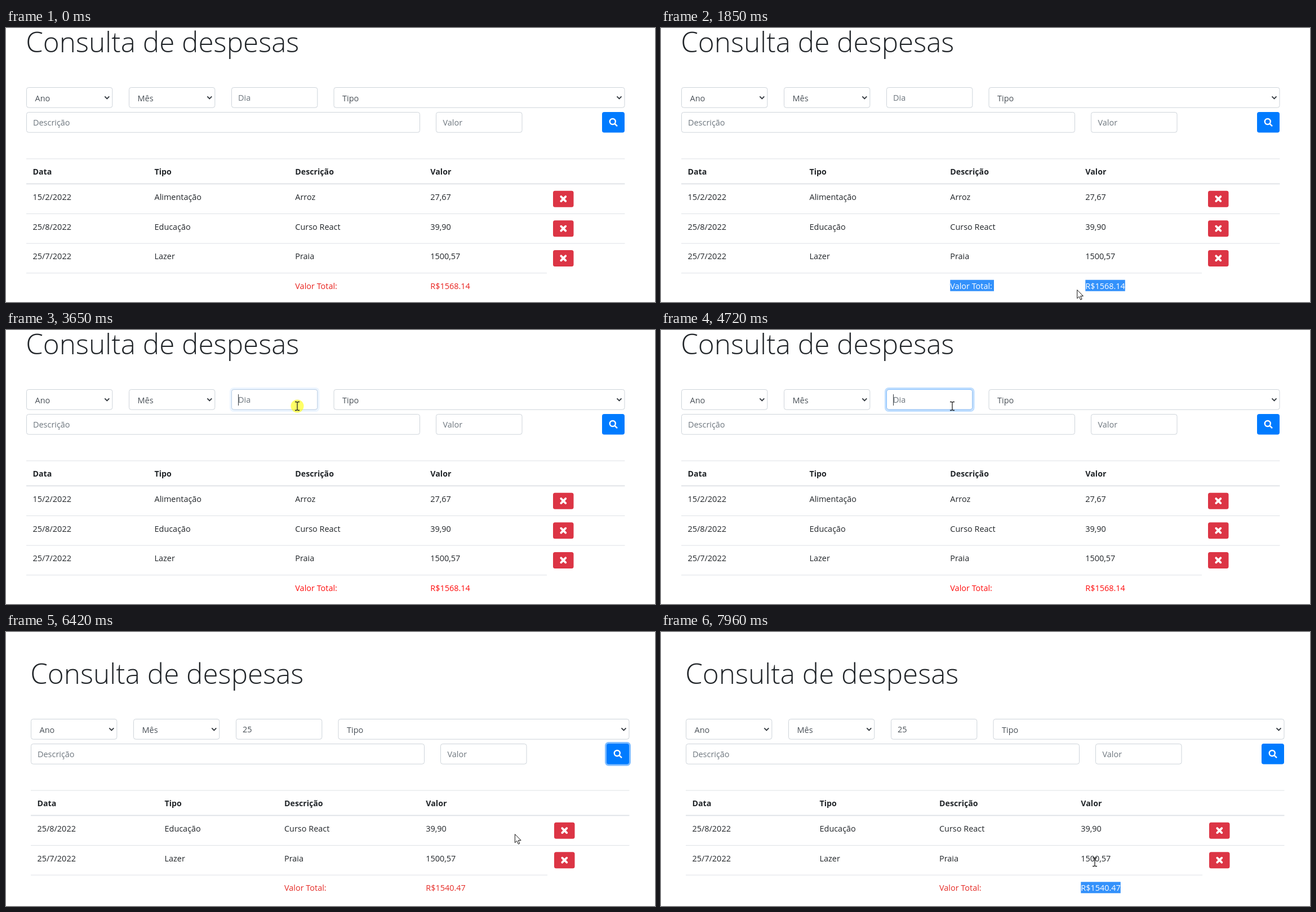
An HTML page that plays this animation: 1152 px wide and 486 px high, repeating every 8 s.

```html
<!DOCTYPE html>
<html lang="pt">
<head>
<meta charset="utf-8">
<title>Consulta de despesas</title>
<style>
html, body { margin: 0; width: 100%; height: 100%; overflow: hidden; background: #fff; }
svg { display: block; width: 1152px; height: 486px; cursor: default; }
text { font: 14.45px "Open Sans", "Noto Sans", sans-serif; fill: #212529; white-space: pre; user-select: none; }
.title { font-size: 49.4px; font-weight: 300; }
.head { font-size: 14.2px; font-weight: 700; }
.value { fill: #495057; }
.hint { fill: #6c757d; }
.selected text { fill: #fff; }
.field { fill: #fff; stroke: #ced4da; }
.chevron { fill: none; stroke: #343a40; stroke-width: 1.9; }
.rule { fill: #dee2e6; }
.selected, .overlay { pointer-events: none; }
</style>
</head>
<body>
<svg id="stage" viewBox="0 0 1152 486">
  <defs><clipPath id="sel"><rect id="selLabel"/><rect id="selValue"/></clipPath></defs>
  <g id="page"></g>
  <g class="overlay" id="pointer">
    <circle id="halo" r="11.5" fill="#ff0" fill-opacity=".6"/>
    <path id="arrow" fill="#fff" stroke="#111" d="M.5.5V15.6L4 12.3 6.5 18 8.9 17 6.5 11.4H11.2Z"/>
    <path id="beam" fill="none" stroke="#222" stroke-width="1.3" d="M-4-7.5H-1.5L0-6.5 1.5-7.5H4M0-6.5V6.5M-4 7.5H-1.5L0 6.5 1.5 7.5H4"/>
    <path id="hand" fill="#fff" stroke="#111" stroke-linejoin="round" d="M-1.5 1.5Q0-1 1.5 1.5V8Q3.5 6 4.6 8.3 6.8 6.7 7.8 9 10.6 8 10.8 11V15Q10 18 9 20.5H-.5Q-2 17-5 13.5-5.8 10.5-3.2 11.3L-1.5 13ZM1.5 8V11.5M4.6 8.3V12M7.8 9V12.5"/>
  </g>
</svg>
<script>
const LOOP = 8000, RESULT = 5910;
const $ = id => document.getElementById(id);
const page = $('page');

function add(parent, tag, attrs, content) {
  const el = document.createElementNS('http://www.w3.org/2000/svg', tag);
  for (const key in attrs) el.setAttribute(key, attrs[key]);
  if (content) el.textContent = content;
  parent.append(el);
  return el;
}
const put = (el, attrs) => { for (const key in attrs) el.setAttribute(key, attrs[key]); };
const label = (parent, x, y, content, cls = '') =>
  add(parent, 'text', { x, y, class: cls, 'data-shape': 'beam' }, content);
const rule = (parent, x, y, width, height = 1) =>
  add(parent, 'rect', { x, y, width, height, class: 'rule' });
const show = (el, on) => { el.style.display = on ? '' : 'none'; };

function field(x, y, width, shape = 'beam') {
  return add(page, 'rect', { x: x + .5, y: y + .5, width, height: 35.7, rx: 3.8, class: 'field', 'data-shape': shape });
}
function select(x, width, content) {
  field(x, 105, width, 'arrow');
  label(page, x + 15.5, 130, content, 'value').dataset.shape = 'arrow';
  add(page, 'path', { d: `M${x + width - 13} 121.3l4 4 4-4`, class: 'chevron' });
}

// Form
label(page, 35.2, 42.6, 'Consulta de despesas', 'title');
select(36, 152.3, 'Ano');
select(218, 152.3, 'Mês');
const inputRing = add(page, 'rect', { x: 398.5, y: 103.5, width: 156.5, height: 40, rx: 5.5, fill: 'none', stroke: '#bfdeff', 'stroke-width': 3 });
field(400, 105, 152.3);
const inputEdge = add(page, 'rect', { x: 400.5, y: 105.5, width: 152.3, height: 35.7, rx: 3.8, fill: 'none', stroke: '#80bdff' });
const dayHint = label(page, 412, 129, 'Dia', 'hint');
const dayValue = label(page, 412, 129, '', 'value');
const caret = add(page, 'rect', { y: 114, width: 1, height: 20, fill: '#343a40' });
select(581.5, 516, 'Tipo');
field(36, 149, 698);
label(page, 48, 173, 'Descrição', 'hint');
field(763, 149, 152.5);
label(page, 775.5, 173, 'Valor', 'hint');
const buttonRing = add(page, 'rect', { x: 1055, y: 146, width: 46, height: 42.5, rx: 6.5, fill: '#80bdff' });
const search = add(page, 'rect', { x: 1058, y: 149, width: 40, height: 36.5, rx: 3.8, 'data-shape': 'hand' });
add(page, 'path', { d: 'M1081.8 166a5 5 0 1 1-10 0a5 5 0 1 1 10 0M1080.4 169.6l4.6 4.6', fill: 'none', stroke: '#fff', 'stroke-width': 2.4, class: 'overlay' });

// Expense table: cols are the four text columns and the delete button
function table(cols, rows, total, lineEnd) {
  const g = add(page, 'g', {});
  rule(g, 36, 231.5, 1062.5);
  ['Data', 'Tipo', 'Descrição', 'Valor'].forEach((name, i) => label(g, cols[i], 260, name, 'head'));
  rule(g, 36, 275.5, 1062.5, 1.8);
  rows.forEach((row, r) => {
    const y = r * 52.6;
    row.forEach((cell, i) => label(g, cols[i], 305 + y, cell));
    add(g, 'rect', { x: cols[4], y: 288.7 + y, width: 36.5, height: 29, rx: 3.5, fill: '#dc3545', 'data-shape': 'hand' });
    add(g, 'path', { d: `M${cols[4] + 14.3} ${299.1 + y}l8 8m0-8l-8 8`, stroke: '#fff', 'stroke-width': 3.8, 'stroke-linecap': 'round', class: 'overlay' });
    rule(g, 36, 329 + y, (r < rows.length - 1 ? 1098.5 : lineEnd) - 36);
  });
  const y = 305 + rows.length * 52.6;
  const sums = parent => [label(parent, cols[2], y, 'Valor Total:'), label(parent, cols[3], y, total)];
  const red = sums(g);
  const over = add(g, 'g', { class: 'selected', 'clip-path': 'url(#sel)' });
  add(over, 'rect', { width: 1152, height: 486, fill: '#3391fb' });
  sums(over);
  return { g, red, cols, top: y - 16 };
}
const rows = [
  ['15/2/2022', 'Alimentação', 'Arroz', '27,67'],
  ['25/8/2022', 'Educação', 'Curso React', '39,90'],
  ['25/7/2022', 'Lazer', 'Praia', '1500,57']
];
const full = table([47.5, 263.5, 513.3, 753.3, 971], rows, 'R$1568.14', 960);
const filtered = table([47.5, 273.5, 486, 737.3, 965], rows.slice(1), 'R$1540.47', 953);

// Pointer path: time, x, y
const path = [
  [0, 985, 510], [70, 960, 480], [340, 846, 469], [810, 635, 463], [880, 585, 463], [950, 506, 465],
  [1090, 485, 464], [1360, 485, 464], [1640, 560, 460], [2060, 873, 468], [2250, 873, 468],
  [2530, 985, 410], [2670, 973, 338], [2840, 1010, 280], [3030, 958, 250], [3100, 945, 245],
  [3450, 517, 135], [4720, 517, 135], [5470, 1020, 196], [5600, 1078, 186], [5720, 1082, 185],
  [5930, 1082, 185], [6280, 925, 322], [6420, 903, 358], [7150, 829, 437], [7220, 829, 439],
  [7360, 829, 440], [7600, 711, 450], [7730, 711, 450], [7960, 770, 408]
];
const presses = [[340, 1350], [2050, 2250], [3640, 3770], [5740, 5900], [7350, 7720]];

const clamp = (v, lo, hi) => Math.min(hi, Math.max(lo, v));
const ramp = (t, from, to) => clamp((t - from) / (to - from), 0, 1);

// Monotone cubic interpolation, so pauses stay still
function along(t, axis) {
  const last = path.length - 1;
  if (t >= path[last][0]) return path[last][axis];
  const i = path.findIndex((p, n) => n < last && t < path[n + 1][0]);
  const rate = n => path[n] && path[n + 1] ? (path[n + 1][axis] - path[n][axis]) / (path[n + 1][0] - path[n][0]) : 0;
  const slope = n => {
    const a = rate(n - 1), b = rate(n);
    return a * b <= 0 ? 0 : 2 * a * b / (a + b);
  };
  const h = path[i + 1][0] - path[i][0], u = (t - path[i][0]) / h, v = 1 - u;
  return path[i][axis] * v * v * (1 + 2 * u) + path[i + 1][axis] * u * u * (3 - 2 * u)
    + h * u * v * (slope(i) * v - slope(i + 1) * u);
}

function selection(t) {
  const first = t >= 340 && t < 2250, second = t >= 7350;
  const { cols, top } = first ? full : filtered;
  const x = along(Math.min(t, first ? 1090 : 7650), 1) - (first ? 0 : 8);
  const span = (el, from, end, on) => {
    const start = clamp(x + (el.id === 'selLabel' ? 15 : 0), from, end);
    put(el, { x: start, y: top, width: on ? end - start : 0, height: 20 });
  };
  span($('selLabel'), cols[2], cols[2] + 77.7, first);
  span($('selValue'), cols[3], cols[3] + 70.5, first || second);
}

function draw(t) {
  const done = t >= RESULT;
  put(page, { transform: done ? 'translate(8 49)' : '' });
  show(full.g, !done);
  show(filtered.g, done);
  full.red.forEach(el => { el.style.fill = t < 340 ? '#e8201c' : '#ff0c0c'; });
  filtered.red.forEach(el => { el.style.fill = '#e52a25'; });

  const typed = t < 4800 ? '' : t < 4930 ? '2' : '25';
  dayValue.textContent = typed;
  show(dayHint, !typed);
  put(caret, { x: 412 + typed.length * 8.25 });
  show(caret, t >= 3640 && t < 4180 || t >= 4710 && t < 5460);

  const focus = ramp(t, 3600, 3770) * (1 - ramp(t, 5720, 5890));
  put(inputRing, { opacity: focus });
  put(inputEdge, { opacity: focus });
  put(buttonRing, { opacity: ramp(t, 5790, 5930) * (1 - ramp(t, 7340, 7490)) });
  put(search, { fill: t >= 5560 && t < 5990 ? '#0074ec' : '#007bff' });
  selection(t);

  const x = along(t, 1), y = along(t, 2);
  const under = document.elementFromPoint(x, y);
  const shape = under?.dataset.shape || 'arrow';
  for (const id of ['arrow', 'beam', 'hand']) show($(id), id === shape);
  show($('halo'), presses.some(([down, up]) => t >= down && t < up));
  put($('pointer'), { transform: `translate(${x} ${y})` });
}

const begin = performance.now();
function tick() {
  draw((performance.now() - begin) % LOOP);
  requestAnimationFrame(tick);
}
tick();
</script>
</body>
</html>
```
